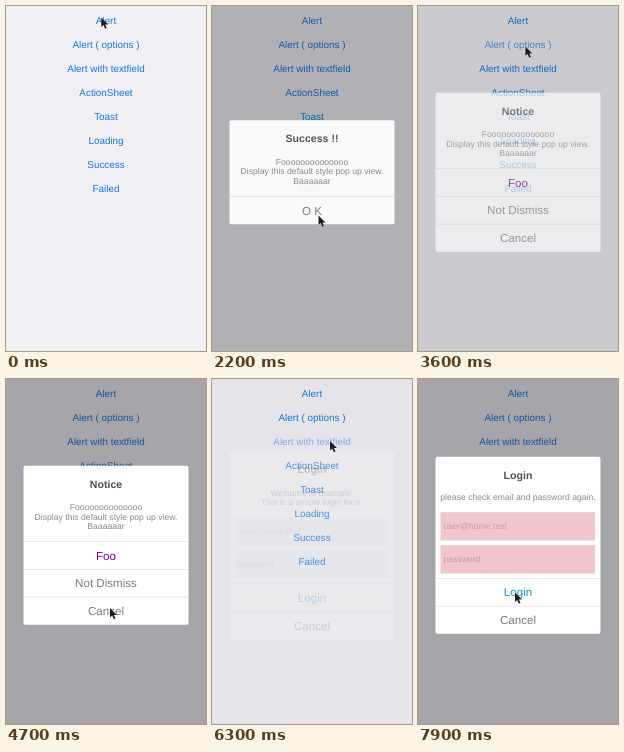
An HTML page for the animation above (8000 ms loop, 200 px wide and 345 px high).

```html
<!DOCTYPE html>
<html lang="en">
<head>
<meta charset="utf-8">
<title>Pop-up demo</title>
<style>
html, body { margin: 0; width: 100%; height: 100%; overflow: hidden; background: #efeff4; }
svg { display: block; width: 100vw; height: 100vh; font-family: "Liberation Sans", Arial, sans-serif; }
text { text-rendering: geometricPrecision; }
.link { font-size: 9.9px; fill: #1678df; }
.title { font-size: 10.6px; font-weight: bold; fill: #505050; }
.body { font-size: 8.65px; fill: #888; }
.button { font-size: 11.6px; fill: #7c7c7c; }
.hint { font-size: 8.6px; }
</style>
</head>
<body>
<svg id="stage" viewBox="0 0 200 345"></svg>
<script>
const LOOP = 8000, STEP = 100;
const stage = document.getElementById('stage');

function add(parent, tag, attrs, text) {
  const el = document.createElementNS('http://www.w3.org/2000/svg', tag);
  for (const key in attrs) el.setAttribute(key, attrs[key]);
  if (text) el.textContent = text;
  parent.appendChild(el);
  return el;
}
const put = (parent, cls, text, y, style = '') =>
  add(parent, 'text', { class: cls, x: 100, y, 'text-anchor': 'middle', style }, text);

const clamp = v => Math.max(0, Math.min(1, v));
const mix = (a, b, k) => a + (b - a) * k;
const ease = k => k * k * (3 - 2 * k);
const blend = (a, b, k) => `rgb(${a.map((v, i) => Math.round(mix(v, b[i], k)))})`;

// List of links
add(stage, 'rect', { width: 200, height: 345, fill: '#efeff4' });
const links = ['Alert', 'Alert ( options )', 'Alert with textfield', 'ActionSheet',
  'Toast', 'Loading', 'Success', 'Failed'].map((s, i) => put(stage, 'link', s, 17.6 + i * 24));
const shade = add(stage, 'rect', { width: 200, height: 345, fill: '#000' });

// Pop-ups: content is laid out from the top edge, buttons from the bottom edge
const ROW = 27.75;
function popup({ title, lines, buttons, height }) {
  const root = add(stage, 'g', {});
  const card = add(root, 'rect', { x: 17.5, width: 165, rx: 2, fill: '#fff' });
  const head = add(root, 'g', {});
  put(head, 'title', title, 22);
  const body = add(head, 'g', {});
  lines.forEach((s, i) => put(body, 'body', s, 44.4 + i * 9.5));
  const foot = add(root, 'g', {});
  buttons.forEach(([s, color], i) => {
    const y = (i - buttons.length) * ROW;
    add(foot, 'rect', { x: 17.5, y: y - 0.3, width: 165, height: 0.7, fill: '#dedede' });
    put(foot, 'button', s, y + 18, color ? 'fill:' + color : '');
  });
  function size(h) {
    const top = 166.3 - h / 2;
    card.setAttribute('y', top);
    card.setAttribute('height', h);
    head.setAttribute('transform', `translate(0 ${top})`);
    foot.setAttribute('transform', `translate(0 ${top + h})`);
  }
  size(height);
  return { root, head, body, size };
}

const lines = ['F' + 'o'.repeat(14), 'Display this default style pop up view.', 'Baaaaaar'];
const alertBox = popup({ title: 'Success !!', lines, buttons: [['O K']], height: 104 });
const noticeBox = popup({ title: 'Notice', lines, height: 159,
  buttons: [['Foo', '#800080'], ['Not Dismiss'], ['Cancel']] });
const loginBox = popup({ title: 'Login', height: 188,
  lines: ['Welcome to example.', 'This is a simple login form.'],
  buttons: [['Login', '#1a92c6'], ['Cancel']] });

const warning = put(loginBox.head, 'body', 'please check email and password again.', 43.2);
const fields = add(loginBox.head, 'g', {});
const inputs = ['user@home.test', 'password'].map((s, i) => ({
  box: add(fields, 'rect', { x: 22.5, y: 66 + i * 33, width: 154.5, height: 28.3 }),
  hint: add(fields, 'text', { class: 'hint', x: 25.5, y: 83.2 + i * 33 }, s)
}));

function setError(k) {
  loginBox.size(mix(188, 177, k));
  loginBox.body.setAttribute('opacity', 1 - k);
  warning.setAttribute('opacity', k);
  fields.setAttribute('transform', `translate(0 ${-10.6 * k})`);
  for (const { box, hint } of inputs) {
    box.setAttribute('fill', blend([239, 239, 252], [240, 197, 204], k));
    hint.setAttribute('fill', blend([188, 188, 204], [207, 154, 163], k));
  }
}

const cursor = add(stage, 'path', {
  d: 'M0 0V9.6L2.2 7.6 3.8 11.2 5.5 10.4 3.9 7H7Z',
  fill: '#1c1c1e', stroke: '#fff', 'stroke-width': 0.7, 'stroke-opacity': 0.8,
  'paint-order': 'stroke'
});

// Pointer stops: time, x, y
const path = [
  [0, 95.3, 11.5], [900, 95.3, 11.5], [1200, 128, 105], [1400, 106, 213], [1500, 106, 213],
  [1700, 106.5, 209.5], [2500, 106.5, 209.5], [2900, 130, 108], [3200, 120, 50], [3300, 107.4, 40.5],
  [4300, 107.4, 40.5], [4500, 113, 135], [4700, 104, 229], [5300, 104, 229],
  [5600, 131.8, 86.7], [5900, 118, 62], [6500, 118, 62], [6800, 129.5, 138.5],
  [7000, 129.5, 140], [7400, 97, 213.5], [8000, 97, 213.5]
];
function pointer(t) {
  let i = 1;
  while (i < path.length - 1 && path[i][0] < t) i++;
  const a = path[i - 1], b = path[i], k = ease(clamp((t - a[0]) / (b[0] - a[0])));
  return [mix(a[1], b[1], k), mix(a[2], b[2], k)];
}

// How far a pop-up that appears at start and leaves at end is shown
function presence(t, start, end) {
  const shown = ease(clamp((t - start + 100) / 400));
  const gone = clamp((t - end + 35) / 235);
  return shown * (1 - gone);
}
const press = (t, at) => t < at ? 1 : mix(0.2, 1, clamp((t - at) / 300));

const shows = [[alertBox, 300, 2200], [noticeBox, 3500, 5200], [loginBox, 6300, 9000]];
const taps = [300, 3400, 6200];

function draw(t) {
  let dark = 0;
  for (const [box, start, end] of shows) {
    const o = presence(t, start, end);
    // the card stays more solid than the shade behind it
    box.root.setAttribute('opacity', 1 - (1 - o) ** 1.5);
    dark = Math.max(dark, o);
  }
  shade.setAttribute('opacity', 0.305 * dark);
  taps.forEach((at, i) => links[i].setAttribute('opacity', press(t, at)));
  setError(ease(clamp((t - 7600) / 300)));
  cursor.setAttribute('transform', `translate(${pointer(t)})`);
}

function tick() {
  const t = performance.now() % LOOP;
  draw(Math.floor(t / STEP) * STEP);
  requestAnimationFrame(tick);
}
tick();
</script>
</body>
</html>
```
